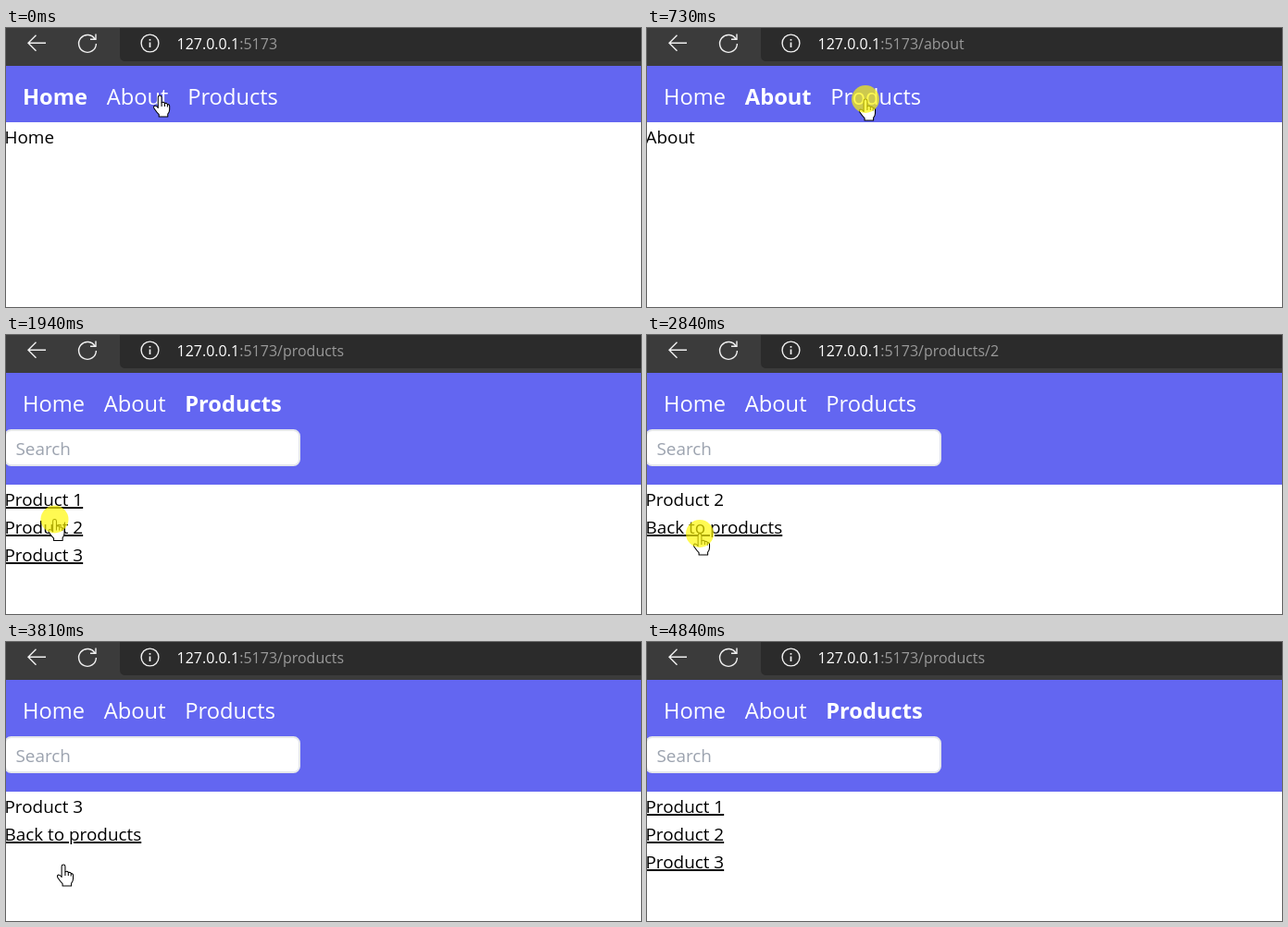
Recreate the animation shown at these times as an HTML page. Size 686 by 302 pixels, loop 4910 ms.

```html
<!DOCTYPE html>
<html lang="en">
<head>
<meta charset="utf-8">
<title>Router demo</title>
<style>
  html, body { margin: 0; width: 100%; height: 100%; overflow: hidden; background: #fff; }
  #stage { position: relative; width: 686px; height: 302px; overflow: hidden; background: #fff;
           font: 18.9px "Open Sans", "Noto Sans", sans-serif; color: #000; }
  #stage > * { position: absolute; left: 0; top: 0; }
  #stage > #nav { top: 41px; width: 100%; background: #6366f1; }
  #stage > #search { left: -2px; top: 102px; width: 320px; height: 40px; box-sizing: border-box;
                     padding-left: 10.5px; line-height: 40px; color: #9ca3af;
                     background: #fff; border: 2px solid #e5e7eb; border-radius: 7.5px; }
  #search { line-height: 39px !important; }
  #stage > #url { left: 184.5px; top: 2px; line-height: 30px; font-size: 16px; color: #999; white-space: pre; }
  #url b { font-weight: 400; color: #fff; }
  #links { position: absolute; left: 18px; top: 18px; display: flex; gap: 20.7px;
           font-size: 23.7px; line-height: 30px; color: #fff; }
  #links .active { font-weight: 700; }
  #stage > #content { left: -1.5px; line-height: 30px; white-space: pre; }
  #content a { text-decoration: underline 1.5px; text-underline-offset: 1px; }
  #press { width: 30px; height: 30px; margin: -15px; border-radius: 50%; background: rgba(255, 247, 0, .68); }
</style>
</head>
<body>
<div id="stage">
  <svg width="686" height="42" fill="none" stroke="#f0f0f0" stroke-width="1.4">
    <path d="M0 0H686V42H0z" fill="#3b3b3b" stroke="none"/>
    <path d="M123 0H686V36H129q-6 0-6-6z" fill="#2b2b2b" stroke="none"/>
    <path d="M43 16.2H24M32.5 7.700 24 16.200 32.500 24.700"/>
    <path d="M96.200 12.300A9.400 9.400 0 1 0 97.400 17M97 6.500V12.300H91"/>
    <circle cx="155.500" cy="16.500" r="9.400"/>
    <path d="M155.500 15.500V21M155.500 12V13.700" stroke-width="1.700"/>
  </svg>
  <div id="url"><b>127.0.0.1</b>:5173<span id="path"></span></div>
  <div id="nav"><div id="links"><span>Home</span><span>About</span><span>Products</span></div></div>
  <div id="search">Search</div>
  <div id="content"></div>
  <svg id="cursor" width="21" height="27" viewBox="-8 -1 22 28" stroke="#000" stroke-width="1.1" stroke-linejoin="round">
    <path fill="#fff" d="M-2 14V2a2 2 0 0 1 4 0V8q2.800-1.200 3.600.9 2.400-.8 3.200 1.100 2.200-.2 2.200 2V16q0 2.600-2 5V24H-1V21.500Q-3.500 19-6.500 14.500q-1-2.500.9-3 1.700-.1 3.600 2.500z"/>
    <path fill="none" d="M2 8v4.500M5.500 9v3.500M8.600 10v3"/>
  </svg>
  <div id="press"></div>
</div>
<script>
const LOOP = 4910, HIDE_CURSOR = 4840;
const PRESS_TIME = 130, URL_DELAY = 70;
const $ = id => document.getElementById(id);

// The pointer travels to each stop, then clicks there to open a page.
const stops = [
  { leave: -70, arrive: 70, click: 200, x: 173, y: 73, page: "About" },
  { leave: 270, arrive: 470, click: 860, x: 236, y: 77, page: "Products" },
  { leave: 1250, arrive: 1740, click: 2070, x: 52.5, y: 199.5, page: "Product 2" },
  { leave: 2140, arrive: 2510, click: 2910, x: 57, y: 215, page: "Products" },
  { leave: 3390, arrive: 3600, click: 3810, x: 62, y: 241, page: "Product 3" },
  { leave: 3950, arrive: 4300, click: 4500, x: 105, y: 206, page: "Products" },
  { leave: 4700, arrive: 4770, x: 246, y: 251 },
];
const START = { x: 159, y: 73 };

const clamp = v => Math.max(0, Math.min(1, v));
const ease = k => k * k * (3 - 2 * k);

const pageAt = t => stops.reduce((page, stop) => t >= stop.click ? stop.page : page, "Home");

function pathOf(page) {
  if (page === "Home") return "";
  return "/" + page.toLowerCase().replace("product ", "products/");
}

function cursorAt(t) {
  let { x, y } = START;
  for (const stop of stops) {
    const k = ease(clamp((t - stop.leave) / (stop.arrive - stop.leave)));
    x += (stop.x - x) * k;
    y += (stop.y - y) * k;
  }
  return { x, y };
}

function renderPage(page) {
  const inProducts = page.startsWith("Product");
  const link = label => `<a>${label}</a>`;
  const lines = page === "Products" ? [1, 2, 3].map(n => link("Product " + n))
    : inProducts ? [page, link("Back to products")] : [page];
  $("content").innerHTML = lines.join("<br>");
  $("content").style.top = (inProducts ? 163 : 103) + "px";
  $("nav").style.height = (inProducts ? 121 : 61) + "px";
  $("search").hidden = !inProducts;
  for (const item of $("links").children) item.classList.toggle("active", item.textContent === page);
}

let shownPage;
function frame(now) {
  const t = now % LOOP;
  const page = pageAt(t);
  if (page !== shownPage) renderPage(shownPage = page);
  $("path").textContent = pathOf(pageAt(t - URL_DELAY));

  const { x, y } = cursorAt(t);
  $("cursor").style.transform = `translate(${x - 7.6}px, ${y - 1}px)`;
  $("cursor").style.visibility = t < HIDE_CURSOR ? "visible" : "hidden";
  $("press").style.transform = `translate(${x}px, ${y}px)`;
  $("press").hidden = !stops.some(({ click }) => t >= click - PRESS_TIME && t < click);
  requestAnimationFrame(frame);
}
frame(performance.now());
</script>
</body>
</html>
```
